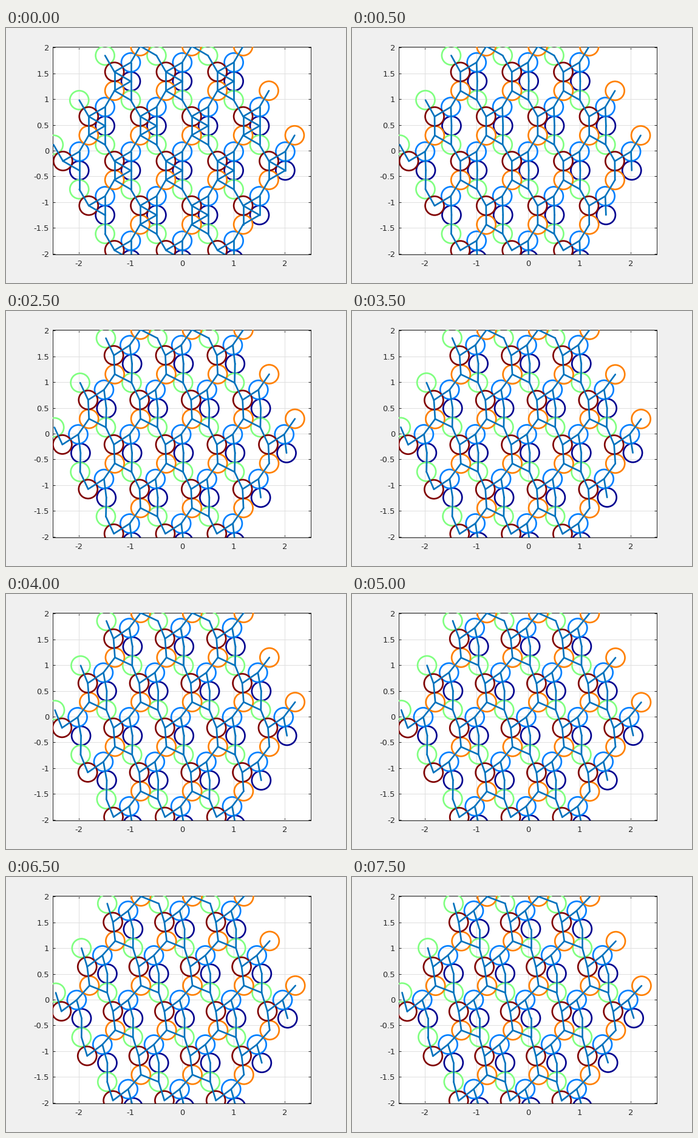
These frames come from a looping animation (560 by 420 pixels, 8 s). A matplotlib script:

```python
import numpy as np
import matplotlib.pyplot as plt
from matplotlib.animation import FuncAnimation
from matplotlib.collections import LineCollection

W, H, DPI = 560, 420, 100
FRAMES, INTERVAL = 16, 500
SCALE = 84.8                     # pixels per data unit
CX, CY = 289.8, 202.0            # pixel of the data origin
LEFT, RIGHT, TOP, BOTTOM = 77, 502, 31, 373
INK = "#262626"
PX = 72 / DPI                    # points per pixel

SIDE = (np.sqrt(3) - 1) / 2      # disk diameter
A1 = np.array([1, 0])
A2 = np.array([0.5, np.sqrt(3) / 2])

# Disks of one cell: navy, blue, green, orange, maroon
NAVY, BLUE, GREEN, ORANGE, MAROON = range(5)
COLORS = [(0, 0, 0.5625), (0, 0.5, 1), (0.5, 1, 0.5), (1, 0.5, 0), (0.5, 0, 0)]

navy = np.array([0.006, -0.385])
up = np.array([0, SIDE])
maroon = navy + SIDE * np.array([-np.sqrt(3) / 2, 0.5])
BASE = np.array([navy, navy + up, navy - up + A2 - A1, maroon - up + A2, maroon])

# Total drift of each disk over the clip, in pixels (y upwards)
DRIFT = np.array([[4.2, 2.2], [-5.0, 1.2], [4.2, 1.9],
                  [1.5, -2.4], [-2.9, -2.4]]) / SCALE

# Bonds: disk, disk, cell offset of the second disk
BONDS = [(MAROON, BLUE, (0, 0)), (BLUE, NAVY, (0, 0)), (BLUE, ORANGE, (0, 0)),
         (MAROON, ORANGE, (0, -1)), (NAVY, GREEN, (1, -1)),
         (ORANGE, GREEN, (1, 0)), (GREEN, MAROON, (0, 0))]
CONTACTS = [(MAROON, NAVY, (0, 0)), (NAVY, ORANGE, (0, -1))]

# Hexagonal patch of cells
CELLS = [(i, j) for j in range(-2, 3) for i in range(-2, 3) if abs(i + j) <= 2]
INDEX = {cell: k for k, cell in enumerate(CELLS)}
ORIGINS = np.array([i * A1 + j * A2 for i, j in CELLS])


def pairs(bonds):
    out = []
    for a, b, (di, dj) in bonds:
        for (i, j), k in INDEX.items():
            other = INDEX.get((i + di, j + dj))
            if other is not None:
                out.append(((a, k), (b, other)))
    return np.array(out)


LASTING = pairs(BONDS)
ALL = pairs(BONDS + CONTACTS)


def positions(k):
    """Disk centres, indexed by kind and cell."""
    t = k / (FRAMES - 1)
    rate = np.full((5, 2), t)
    rate[NAVY, 0] = t ** 0.6     # the middle disk buckles out faster at first
    cell = BASE + DRIFT * rate
    return cell[:, None, :] + ORIGINS[None, :, :]


fig = plt.figure(figsize=(W / 100, H / 100), dpi=DPI, facecolor="#f0f0f0")
ax = fig.add_axes([LEFT / W, 1 - BOTTOM / H, (RIGHT - LEFT) / W, (BOTTOM - TOP) / H])

xticks, yticks = np.arange(-2, 3), np.arange(-2, 2.1, 0.5)
ax.set_xticks(xticks, [f"{v:g}" for v in xticks])
ax.set_yticks(yticks, [f"{v:g}" for v in yticks])
ax.tick_params(direction="in", top=True, right=True, length=4.25 * PX,
               width=PX, color=INK, labelcolor=INK, labelsize=13 * PX)
ax.tick_params(axis="x", pad=8.5 * PX)
ax.tick_params(axis="y", pad=6 * PX)
for label in ax.get_xticklabels() + ax.get_yticklabels():
    label.set_fontfamily("DejaVu Sans")
ax.grid(True, color="#dfdfdf", linewidth=PX)
ax.set_axisbelow(True)
for spine in ax.spines.values():
    spine.set(color=INK, linewidth=PX, zorder=1)

start = positions(0)
disks = [ax.scatter(*start[n].T, s=(SIDE * SCALE * PX) ** 2, facecolors="none",
                    edgecolors=[COLORS[n]], linewidths=2.67 * PX, zorder=3)
         for n in range(5)]
bonds = LineCollection([], colors=[(0, 0.447, 0.741)], linewidths=2.67 * PX,
                       capstyle="round", zorder=4)
ax.add_collection(bonds, autolim=False)
ax.set(xlim=((LEFT - CX) / SCALE, (RIGHT - CX) / SCALE),
       ylim=((CY - BOTTOM) / SCALE, (CY - TOP) / SCALE))


def draw(k):
    pts = positions(k)
    for disk, xy in zip(disks, pts):
        disk.set_offsets(xy)
    ends = ALL if k == 0 else LASTING
    bonds.set_segments(pts[ends[..., 0], ends[..., 1]])
    return [*disks, bonds]


anim = FuncAnimation(fig, draw, frames=FRAMES, interval=INTERVAL,
                     repeat=True, repeat_delay=0, blit=False)
plt.show()
```
